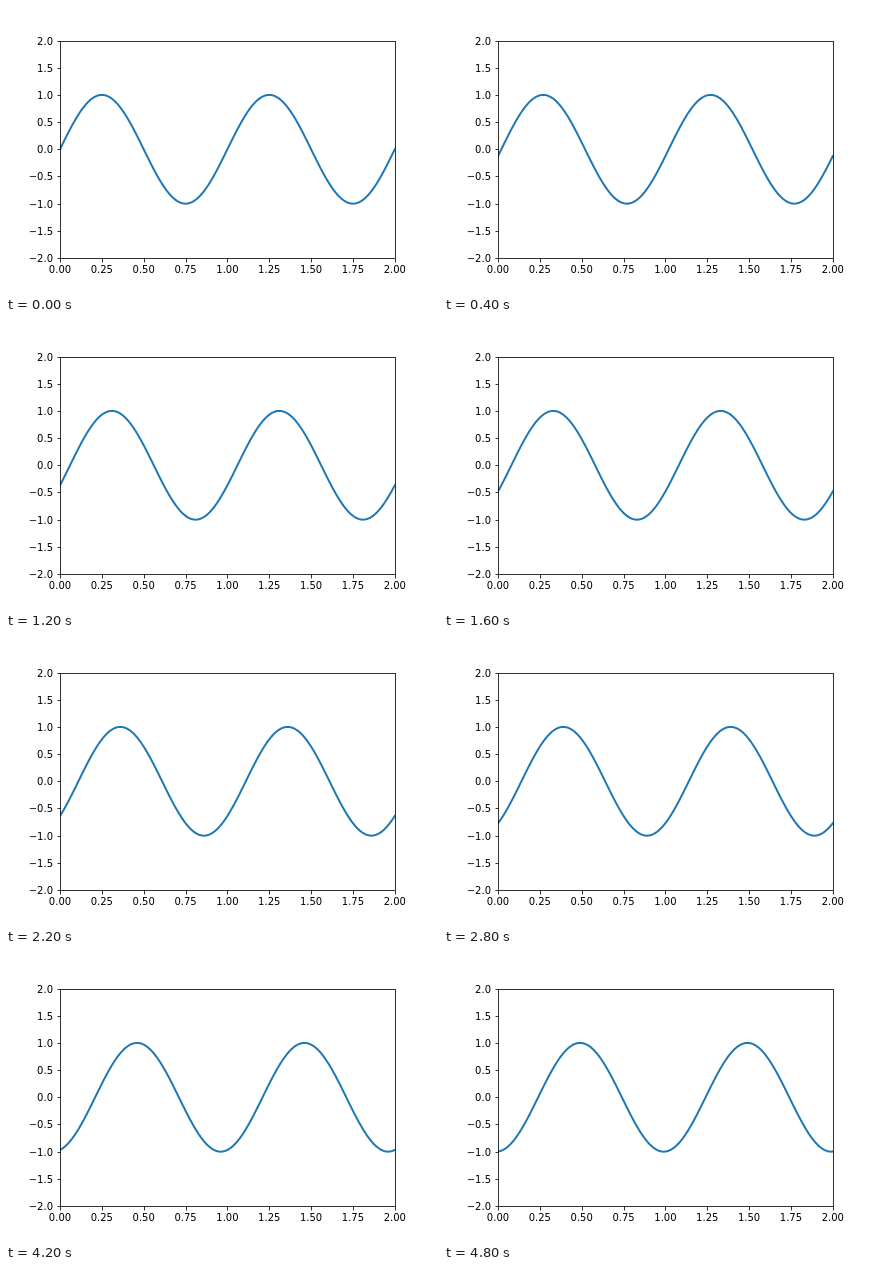
An HTML page with a canvas for the animation above (5000 ms loop, 432x288 px).

```html
<!DOCTYPE html>
<html lang="en">
<head>
<meta charset="utf-8">
<title>Travelling sine wave</title>
<style>
  html, body { margin: 0; width: 100%; height: 100%; overflow: hidden; background: #fff; }
  canvas { display: block; }
</style>
</head>
<body>
<canvas id="plot" width="432" height="288"></canvas>
<script>
const ctx = document.getElementById('plot').getContext('2d');
const W = 432, H = 288;
const LEFT = 54, RIGHT = 388.8, TOP = 34.56, BOTTOM = 252;
const LOOP = 5000, STEP = 200, SHIFT = 0.01;

const px = x => LEFT + (x / 2) * (RIGHT - LEFT);
const py = y => BOTTOM - ((y + 2) / 4) * (BOTTOM - TOP);

function line(x1, y1, x2, y2) {
  ctx.beginPath();
  ctx.moveTo(x1, y1);
  ctx.lineTo(x2, y2);
  ctx.stroke();
}

function drawCurve(offset) {
  const x0 = LEFT, y0 = Math.round(TOP);
  ctx.save();
  ctx.beginPath();
  ctx.rect(x0, y0, Math.round(RIGHT) - x0, BOTTOM - y0);
  ctx.clip();
  ctx.strokeStyle = '#1f77b4';
  ctx.lineWidth = 2;
  ctx.lineCap = 'square';
  ctx.lineJoin = 'round';
  ctx.beginPath();
  for (let i = 0; i < 1000; i++) {
    const x = 2 * i / 999;
    ctx.lineTo(px(x), py(Math.sin(2 * Math.PI * (x - offset))));
  }
  ctx.stroke();
  ctx.restore();
}

function drawAxes() {
  ctx.strokeStyle = ctx.fillStyle = '#000';
  ctx.lineWidth = 0.8;
  ctx.font = '10px "DejaVu Sans", sans-serif';
  ctx.textBaseline = 'alphabetic';

  const top = Math.round(TOP);
  ctx.strokeRect(LEFT + 0.5, top + 0.5, Math.round(RIGHT) - LEFT, BOTTOM - top);

  ctx.textAlign = 'center';
  for (let i = 0; i <= 8; i++) {
    const x = px(i / 4), tick = Math.round(x) + 0.5;
    line(tick, BOTTOM + 0.5, tick, BOTTOM + 4.5);
    ctx.fillText((i / 4).toFixed(2), x, BOTTOM + 15);
  }

  ctx.textAlign = 'right';
  for (let i = -4; i <= 4; i++) {
    const y = Math.round(py(i / 2));
    line(LEFT - 2.5, y + 0.5, LEFT + 0.5, y + 0.5);
    ctx.fillText((i / 2).toFixed(1).replace('-', '\u2212'), LEFT - 7, y + 4);
  }
}

function draw(now) {
  const step = Math.floor((now % LOOP) / STEP);
  ctx.fillStyle = '#fff';
  ctx.fillRect(0, 0, W, H);
  drawCurve(step * SHIFT);
  drawAxes();
}

function frame() {
  draw(performance.now());
  requestAnimationFrame(frame);
}
frame();
</script>
</body>
</html>
```
